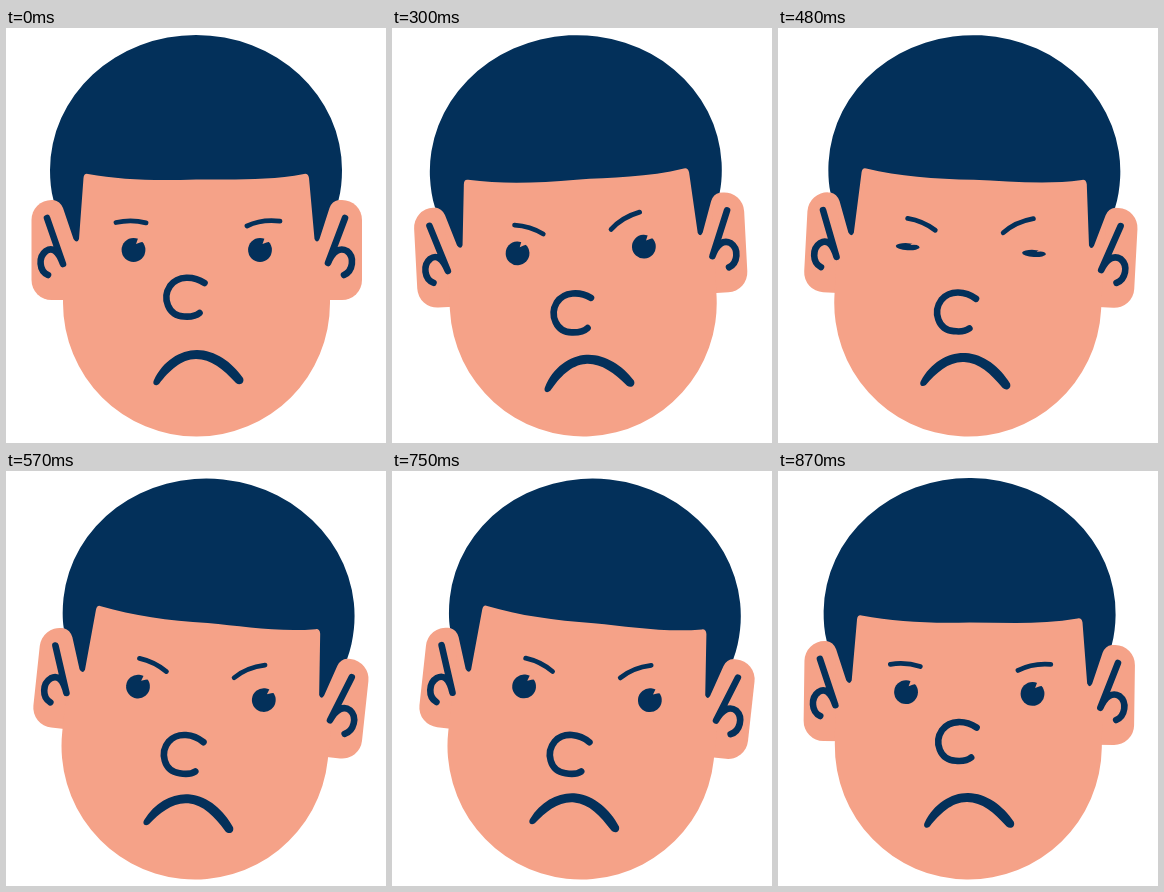
These frames come from a looping animation (380x415 px, 0.9 s). An HTML page:

```html
<!DOCTYPE html>
<html lang="en">
<head>
<meta charset="utf-8">
<title>Angry head shake</title>
<style>
  html, body { margin: 0; width: 100%; height: 100%; overflow: hidden; background: #fff; }
  svg { display: block; width: 380px; height: 415px; }
  .skin { fill: #f5a288; }
  .ink { fill: #03305a; }
  .line { fill: none; stroke: #03305a; stroke-width: 6.6; stroke-linecap: round; stroke-linejoin: round; }
  .thin { stroke-width: 4.8; }
</style>
</head>
<body>
<svg viewBox="0 0 380 415">
  <defs>
    <g id="eye">
      <circle class="ink" r="11.9"/>
      <path class="skin" d="M2.5-6L5-13L10.500-8.500L6.500-7.500Z"/>
    </g>
  </defs>
  <g id="head">
    <g class="skin">
      <rect x="25.5" y="172" width="60" height="100" rx="20"/>
      <rect x="296" y="172" width="60" height="100" rx="20"/>
      <path d="M57 140H324V275A133.5 133.5 0 0 1 57 275Z"/>
    </g>
    <path class="ink" d="M67.500 211L57 180Q54 173 47.500 172C45 163 44 152 44 142A146 135 0 0 1 336 142C336 152 335 163 332.500 172Q326 173 323.500 180L313.500 211Q311 216 308.500 211L303 150Q302 145 298 146C262 153 225 151 190 151.500C150 153 115 152 82 146Q78 145 77.500 150L73 211Q71 216 67.500 211Z"/>
    <path class="line" d="M41 190L57 236C52 222 46 219 40 223C32 229 33 243 42 247"/>
    <path class="line" d="M339 190L322 235C327 223 334 219 341 223C349 229 347 243 338 247"/>
    <path class="line thin" id="browL" d="M-15 .5Q0-3 15 .8"/>
    <path class="line thin" id="browR" d="M-16.500 2.500Q-2-4.500 16.500-2.300"/>
    <use href="#eye" id="eyeL"/>
    <use href="#eye" id="eyeR"/>
    <path class="line" id="nose" d="M198.500 255C188 248 172 247 164 258C156 270 162 288 178 288.500C185 289 190 288 193.500 285"/>
    <path class="ink" id="mouth" d="M148 352C157 333 174 322 191 322C209 322 226 334 237 350C239 355 234 358 230 355C217 341 205 331 190 331C175 331 163 343 153 356C149 359 146 356 148 352Z"/>
  </g>
</svg>
<script>
const LOOP = 900, STEP = 30;
const smooth = u => (1 - Math.cos(Math.PI * u)) / 2;
const soft = u => (smooth(u) + u) / 2;

// Tracks are lists of [time, value].
const TILT = [[0, 0], [225, -4.5], [680, 8.6], [900, 0]];
const FROWN = [[0, 0], [150, 1], [750, 1], [900, 0]];
const MOUTH = [[0, 0], [150, 5], [300, 5], [660, 1.2], [900, 0]];
const LIDS = [[0, 1], [390, 1], [480, .3], [570, 1], [900, 1]];

function sample(track, t, ease) {
  const i = track.findIndex(k => k[0] > t);
  const [t0, a] = track[i - 1], [t1, b] = track[i];
  return a + (b - a) * ease((t - t0) / (t1 - t0));
}

const part = {};
for (const el of document.querySelectorAll('svg [id]')) part[el.id] = el;
const place = (id, value) => part[id].setAttribute('transform', value);

function draw(t) {
  const frown = sample(FROWN, t, smooth);
  const drop = Math.sin(frown * Math.PI / 2); // brows tip before they slide
  const lids = sample(LIDS, t, smooth);
  place('head', `rotate(${sample(TILT, t, soft)} 190 261)`);
  place('browL', `translate(${125 + 15.3 * frown} ${194 + 4.3 * drop}) rotate(${19.5 * drop})`);
  place('browR', `translate(${257.5 - 20.7 * frown} ${195.5 - .5 * drop}) rotate(${-20 * drop})`);
  place('eyeL', `translate(127.5 222) scale(1 ${lids})`);
  place('eyeR', `translate(254 222) scale(1 ${lids})`);
  place('nose', `translate(0 ${15.3 * frown})`);
  place('mouth', `translate(0 ${sample(MOUTH, t, smooth)})`);
}

const start = performance.now();
function tick() {
  const t = (performance.now() - start) % LOOP;
  draw(Math.floor(t / STEP) * STEP);
  requestAnimationFrame(tick);
}
tick();
</script>
</body>
</html>
```
